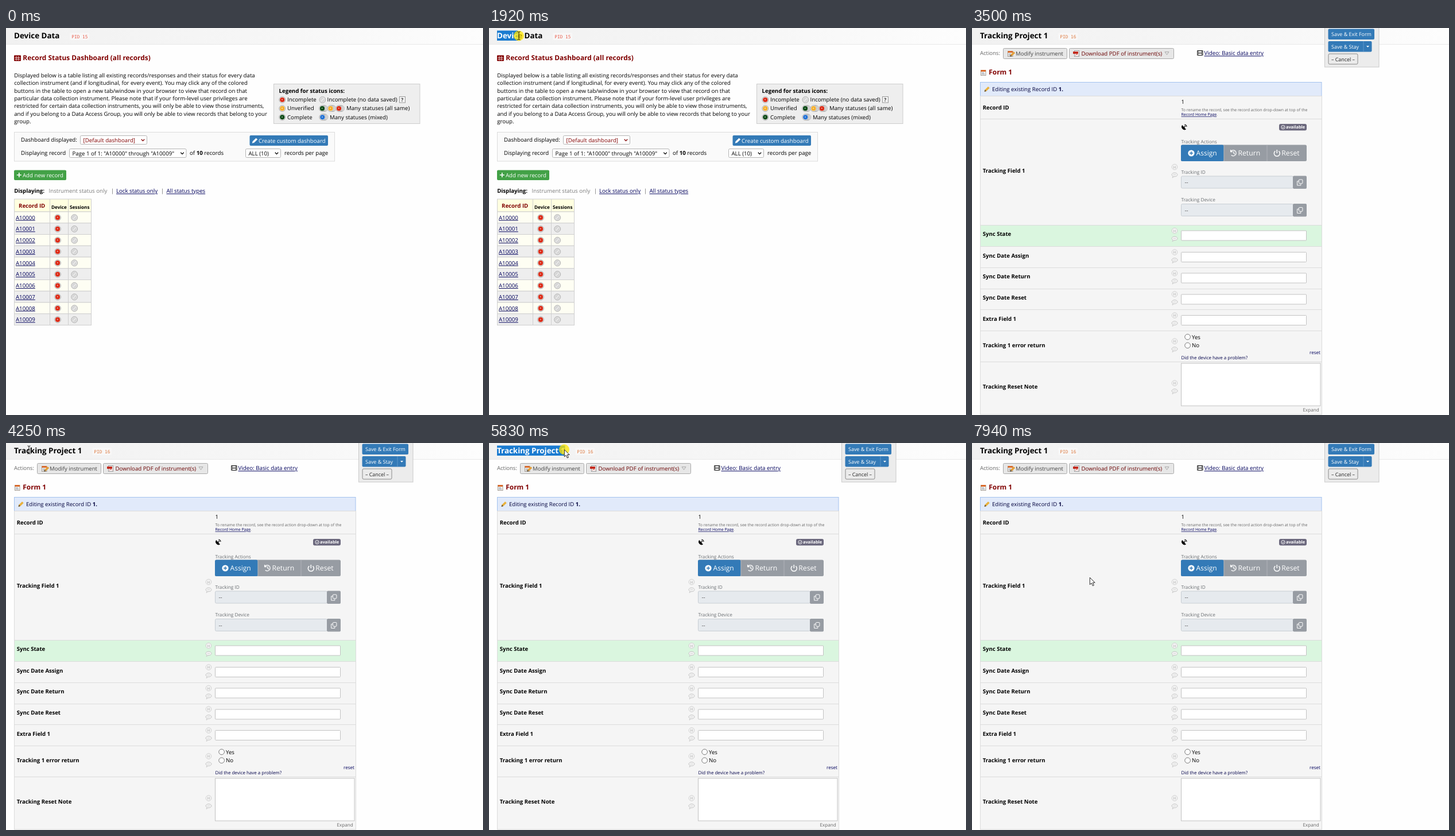
These frames come from a looping animation (831x674 px, 8000 ms). An HTML page:

```html
<!DOCTYPE html>
<html lang="en">
<head>
<meta charset="utf-8">
<title>Record forms</title>
<style>
html, body { margin: 0; width: 100%; height: 100%; overflow: hidden; background: #fefefe; }
svg { display: block; width: 831px; height: 674px; font-family: "Open Sans", "Noto Sans", sans-serif; }
text { white-space: pre; text-rendering: geometricPrecision; }
.b { font-weight: 700; }
.u { text-decoration: underline; }
.m { font-family: "DejaVu Sans Mono", monospace; }
</style>
</head>
<body>
<svg id="stage" viewBox="0 0 831 674"></svg>
<script>
const LOOP = 8000;
const NAVY = '#00005c', MAROON = '#800000', BLUE = '#337ab7', GREY = '#979ca3';

const text = (x, y, s, size = 9.68, fill = '#000', cls = '') =>
  `<text x="${x}" y="${y}" font-size="${size}" fill="${fill}" class="${cls}">${s}</text>`;
const rect = (x, y, w, h, fill, stroke = 'none', r = 0) =>
  `<rect x="${x}" y="${y}" width="${w}" height="${h}" fill="${fill}" stroke="${stroke}" rx="${r}"/>`;
const line = (d, stroke, w = 1, fill = 'none') =>
  `<path d="${d}" stroke="${stroke}" stroke-width="${w}" fill="${fill}"/>`;
const shape = (d, fill) => `<path d="${d}" fill="${fill}"/>`;
const disc = (x, y, r, fill, stroke = 'none', w = 1) =>
  `<circle cx="${x}" cy="${y}" r="${r}" fill="${fill}" stroke="${stroke}" stroke-width="${w}"/>`;
const at = (x, y, s) => `<g transform="translate(${x} ${y})">${s}</g>`;
const each = (list, f) => list.map(f).join('');

const chevron = (x, y, c = '#222') => line(`M${x - 2.7} ${y - 1.4}l2.7 2.8 2.7-2.8`, c, 1.3);
const select = (x, y, w, s, fill = '#000') =>
  rect(x + .5, y + .5, w - 1, 15, '#fff', '#b5b5b5', 2) +
  text(x + 5.5, y + 11.6, s, 9.68, fill) + chevron(x + w - 7.5, y + 8.2, fill);

const DOTS = { red: '#dc2b17', grey: '#d6d6d6', yellow: '#f5b02e', green: '#0b4a16', blue: '#2472d4' };
function dot(x, y, name) {
  const mark = name === 'grey'
    ? line(`M${x - 2.5} ${y + 2.5}l5-5`, '#f2f2f2', 1.2)
    : disc(x - .3, y - .4, 1, '#fff9');
  return disc(x, y, 5.4, '#eee', '#a3a3a3', .9) + disc(x, y, 4.1, DOTS[name]) + mark;
}
const stack = (x, y, name) =>
  each([4, 2], d => disc(x + d, y, 5.4, '#eee', '#a3a3a3', .8)) + dot(x, y, name);

const pencil = (x, y, body, tip) =>
  at(x, y, shape('M0 9l1-3.5 5.6-5.4 2.6 2.4L3.5 8z', body) + shape('M0 9l1-3.5 2.5 2.5z', tip));
const clipboard = (x, y) => at(x, y,
  rect(.5, 1.5, 8.5, 9, '#f7f3ee', '#a09a94') + rect(.5, 1, 8.5, 3, '#d96a2b') +
  line('M2 6h4M2 8.2h5', '#8290a5'));

const header = (pid, x, color) =>
  rect(0, 0, 831, 28, 'url(#bar)') + rect(0, 28, 831, .8, '#e4e4e4') +
  rect(x - 3, 8.5, 34, 12.5, '#f8f7f7', 'none', 2) + text(x, 17.6, pid, 7.75, color, 'm');

// Title with a selection that a clip rectangle reveals
const title = (id, s) =>
  text(14, 17.8, s, 13.4, '#000', 'b') +
  `<g clip-path="url(#clip${id})">` + rect(0, 4.5, 300, 17.5, '#1a7bd0') +
  text(14, 17.8, s, 13.4, '#fff', 'b') + '</g>';

const INTRO = [
  'Displayed below is a table listing all existing records/responses and their status for every data',
  'collection instrument (and if longitudinal, for every event). You may click any of the colored',
  'buttons in the table to open a new tab/window in your browser to view that record on that',
  'particular data collection instrument. Please note that if your form-level user privileges are',
  'restricted for certain data collection instruments, you will only be able to view those instruments,',
  'and if you belong to a Data Access Group, you will only be able to view records that belong to your',
  'group.'];

function legend() {
  return rect(466.5, 97.5, 254.5, 69, '#eee', '#cdcdcd') +
    text(475.5, 112.6, 'Legend for status icons:', 9.68, '#000', 'b') +
    dot(481.3, 125, 'red') + text(490, 128, 'Incomplete') +
    dot(551.4, 125, 'grey') + text(559.5, 128, 'Incomplete (no data saved)') +
    rect(685.5, 119.5, 10, 10.5, '#f4f4f4', '#999') + text(688.3, 128, '?', 8.5, '#333', 'b') +
    dot(481.3, 140.2, 'yellow') + text(490, 143.4, 'Unverified') +
    stack(551, 140.2, 'green') + stack(565.5, 140.2, 'yellow') + stack(580, 140.2, 'red') +
    text(593, 143.4, 'Many statuses (all same)') +
    dot(481.3, 155.3, 'green') + text(490, 158.5, 'Complete') +
    stack(551.3, 155.3, 'blue') + text(564, 158.5, 'Many statuses (mixed)');
}

function recordTable() {
  const pitch = 19.75, top = 320;
  const rows = each([...Array(10).keys()], i => {
    const y = top + i * pitch;
    return rect(14.5, y, 134, pitch, i % 2 ? '#eee' : '#fefef3', '#cfcfcf') +
      text(17, y + 13.6, 'A1000' + i, 9.68, NAVY, 'u') +
      dot(90, y + 10.2, 'red') + dot(119.2, y + 10.2, 'grey');
  });
  return rect(14.5, 298, 134, 22, '#ffffe0', '#cfcfcf') + rows +
    line('M76.5 298V517.5M108.5 298V517.5', '#cfcfcf') +
    text(22, 312.6, 'Record ID', 9.68, MAROON, 'b') +
    text(79, 314.6, 'Device', 8.18, '#000', 'b') + text(111, 314.6, 'Sessions', 8.18, '#000', 'b');
}

function dashboard() {
  return header('PID 15', 114.3, '#e8604f') + title('A', 'Device Data') +
    rect(14, 47.5, 12, 10, MAROON, 'none', 1) +
    line('M15.2 51.3h9.6M15.2 54.3h9.6M18 49v7.5M21.8 49v7.5', '#f3dede', .9) +
    text(29.3, 56, 'Record Status Dashboard (all records)', 11.9, MAROON, 'b') +
    each(INTRO, (s, i) => text(14.2, 85.8 + 13.42 * i, s)) + legend() +
    rect(14.5, 181.5, 558, 50.5, '#fafafa', '#dcdcdc') +
    text(26, 198.3, 'Dashboard displayed:') +
    select(129, 187, 117, '[Default dashboard]', MAROON) +
    rect(424.5, 187, 136.5, 18, BLUE, 'none', 2) + pencil(429, 191.6, '#fff', '#fff') +
    text(440, 199.8, 'Create custom dashboard', 9.68, '#fff') +
    text(26, 221.2, 'Displaying record') +
    select(110, 210, 204.5, 'Page 1 of 1: "A10000" through "A10009"') +
    text(320, 221.2, 'of <tspan class="b">10</tspan> records') +
    select(417, 210, 62, 'ALL (10)') + text(485, 221.2, 'records per page') +
    rect(14, 247.5, 91, 17.5, '#42a146', 'none', 2) + line('M18.8 256h8M22.8 252v8', '#fff', 1.6) +
    text(29, 259.6, 'Add new record', 9.68, '#fff') +
    text(14.2, 287.4, 'Displaying:', 9.68, '#000', 'b') +
    text(74.5, 287.4, 'Instrument status only', 9.68, '#7b7b7b') +
    text(183, 287.4, '|', 9.68, '#666') + text(192, 287.4, 'Lock status only', 9.68, NAVY, 'u') +
    text(270, 287.4, '|', 9.68, '#666') + text(279.5, 287.4, 'All status types', 9.68, NAVY, 'u') +
    recordTable();
}

const fieldIcons = y =>
  disc(353, y, 4.8, '#f3f3f3', '#cdcdcd', .9) + text(350.6, y + 2.5, 'H', 6.6, '#aaa') +
  at(353, y + 13.5, `<ellipse rx="5" ry="3.3" fill="#f4f4f4" stroke="#c4c4c4"/>` +
    line('M-3 2.5l-1 3 3-2', '#c4c4c4', .8, '#f4f4f4') + line('M-2.5 0h5', '#ccc', .8));

const copyField = (label, y) =>
  text(364.5, y - 4, label, 8.25, '#6a6e72') +
  rect(364.5, y + .5, 195, 21, '#e6eaee', '#c8ced4', 2) + text(370.5, y + 14.8, '--', 9.68, '#555') +
  rect(559, y, 24, 22.5, GREY, 'none', 2) +
  at(566, y + 6, rect(3.4, .5, 6.5, 6.8, GREY, '#fff', 1) +
    line('M3 3.3H.6v7.2h6.2V8', '#fff'));

const actionButtons = () =>
  rect(364, 203.5, 219, 28.5, GREY, 'none', 2.5) + rect(364, 203.5, 74.5, 28.5, BLUE, 'none', 2.5) +
  line('M439 203.5v28.5M514 203.5v28.5', '#b8bcc2', .8) +
  disc(382, 218, 5.6, '#fff') + line('M379 218h6M382 215v6', BLUE, 1.4) +
  text(390.6, 222, 'Assign', 12, '#fff') +
  line('M451.3 214.5a5 5 0 1 1 .4 7M450.6 212v3.5h3.6M456 214.8v3.4l2 1.5', '#fff', 1.3) +
  text(463.5, 222, 'Return', 12.2, '#fff') +
  line('M528.3 214.3a5 5 0 1 0 6 0M531.3 212v6', '#fff', 1.5) +
  text(539.3, 222, 'Reset', 12.2, '#fff');

const dish = () => at(365, 167,
  shape('M1.2 2A5.2 5.2 0 0 0 8 9.6L5 6.6 6.2 5.4 5 4.3 4 5.3z', '#000') +
  line('M5.2 1.2A4 4 0 0 1 9 5M5.2 3.2A2 2 0 0 1 7 5', '#000', 1.1));

const EDGES = [118.5, 158.5, 343.5, 380.5, 417.5, 454.5, 490.5, 527.5, 581.5, 673];
const LABELS = [
  ['Record ID', 142.3], ['Tracking Field 1', 252, 242], ['Sync State', 362.3, 353],
  ['Sync Date Assign', 399.6, 390.5], ['Sync Date Return', 436.3, 427],
  ['Sync Date Reset', 473.3, 463.5], ['Extra Field 1', 510.2, 500.5],
  ['Tracking 1 error return', 555.5, 545.5], ['Tracking Reset Note', 627.6, 618.5]];

function formTable() {
  return rect(14.5, 94.5, 594.5, 24, '#e1eafa', '#a3c2ee') +
    pencil(21.5, 102, '#e9b13c', '#5b4a35') +
    text(35, 109.6, 'Editing existing Record ID <tspan class="b">1.</tspan>', 9.6, '#00003c') +
    each(LABELS, ([s, y, icon], i) =>
      rect(14.5, EDGES[i], 595, EDGES[i + 1] - EDGES[i], i === 2 ? '#daf6df' : '#f5f5f5', '#dcdcdc') +
      text(18.7, y, s, 9.6, '#000', 'b') + (icon ? fieldIcons(icon) : '')) +
    text(364.5, 132, '1') +
    text(364.5, 145.3, 'To rename the record, see the record action drop-down at top of the', 6.95, '#666') +
    text(364.5, 153.2, `<tspan class="u" fill="${NAVY}">Record Home Page</tspan>.`, 6.95, '#666') +
    dish() + rect(535, 167, 48, 11.5, '#6b687d', 'none', 3) +
    disc(542, 172.7, 3.2, 'none', '#fff', .9) + line('M540.4 172.7l1.3 1.3 2.2-2.4', '#fff', .9) +
    text(547, 175.4, 'available', 7.35, '#fff', 'b') +
    text(364.5, 200.7, 'Tracking Actions', 8.25, '#6a6e72') + actionButtons() +
    copyField('Tracking ID', 257.5) + copyField('Tracking Device', 306) +
    each([353, 390.5, 427, 464, 500.5], y => rect(364.5, y, 218, 17, '#fff', '#c2c2c2', 1)) +
    each([['Yes', 538], ['No', 552.8]], ([s, y]) =>
      disc(375.6, y, 4.8, '#fff', '#777') + text(383, y + 3.6, s)) +
    text(588, 567.6, 'reset', 8.1, NAVY) +
    text(364.5, 576.6, 'Did the device have a problem?', 7.96, '#00004a') +
    rect(364.5, 584, 242.5, 74, '#fff', '#c2c2c2') + text(576.5, 667.5, 'Expand', 8.1, '#666');
}

function form() {
  return header('PID 16', 153.3, '#dd7d45') + title('B', 'Tracking Project 1') +
    text(14, 47.3, 'Actions:', 9.5, '#666') +
    rect(54.5, 35.5, 111, 18, '#e7e7e7', '#a9a9a9', 2) + clipboard(62, 39) +
    pencil(66, 41, '#e3a03c', '#555') + text(76, 48.4, 'Modify instrument', 9.6, '#444') +
    rect(169.5, 35.5, 182, 18, '#e7e7e7', '#a9a9a9', 2) +
    rect(178.5, 39.5, 8, 10, '#fff', '#999') + rect(176, 41, 9, 4, '#c32b1f') +
    line('M180 47.5l3-2 2 2', '#c32b1f') +
    text(190.5, 48.4, 'Download PDF of instrument(s)', 9.68, '#6a0000') +
    line('M336 41.6h7l-3.5 5z', '#999', .8) +
    rect(392, 39, 10.5, 9, '#111', 'none', 1) + rect(394.4, 40.2, 5.6, 2.8, '#fff') +
    rect(394.4, 44.2, 5.6, 2.8, '#fff') + line('M393.2 40v7.5M401.2 40v7.5', '#ddd', .9) +
    text(404.5, 47.4, 'Video: Basic data entry', 9.75, NAVY, 'u') +
    clipboard(15, 72) + text(29.3, 81, 'Form 1', 11.9, MAROON, 'b') +
    rect(614.5, -2, 94.5, 70, '#ececec', '#c9c9c9') +
    rect(620.5, 1.5, 80.5, 18.5, BLUE, 'none', 2) + text(626, 14.2, 'Save &amp; Exit Form', 8.95, '#fff') +
    rect(620.5, 23, 76, 18.5, BLUE, 'none', 2) + text(626, 35.7, 'Save &amp; Stay', 8.95, '#fff') +
    line('M682 23v18.5', '#6aa0d0', .8) + shape('M687 31h5l-2.5 2.8z', '#fff') +
    rect(621, 45, 51, 18, '#ebebeb', '#8a8a8a', 2) + text(626, 57.6, '– Cancel –', 8.9, '#222') +
    formTable();
}

const stage = document.getElementById('stage');
stage.innerHTML =
  `<defs><linearGradient id="bar"><stop stop-color="#f1f1f1"/><stop offset=".6" stop-color="#f7f7f7"/>
   <stop offset="1" stop-color="#fdfdfd"/></linearGradient>` +
  each(['A', 'B'], id => `<clipPath id="clip${id}"><rect id="sel${id}" x="14" y="0" width="0" height="30"/></clipPath>`) +
  '</defs>' + rect(0, 0, 831, 674, '#fefefe') +
  `<g id="pageA">${dashboard()}</g><g id="pageB">${form()}</g>
   <g id="pointer"><circle id="halo" r="9" fill="#ffe600" opacity=".75"/>
   <path id="arrow" d="M.3.3V12.6L3.2 10 5.3 14.7 7.4 13.8 5.3 9.2H9.2z" fill="#fff" stroke="#111" stroke-width=".9"/>
   <path id="beam" d="M-2.5-7q2 0 2.5 1 .5-1 2.5-1M0-6V6M-2.5 7q2 0 2.5-1 .5 1 2.5 1" fill="none" stroke="#111"/></g>`;

const $ = id => document.getElementById(id);
const show = (id, on) => $(id).setAttribute('visibility', on ? 'visible' : 'hidden');

// Character boxes of each title, for selecting letter by letter
const glyphs = {};
for (const id of ['A', 'B']) {
  const el = $('page' + id).querySelector('g[clip-path] text');
  glyphs[id] = [...el.textContent].map((_, i) =>
    [el.getStartPositionOfChar(i).x, el.getEndPositionOfChar(i).x]);
}

// Pointer moves: start, end, then way points; the pointer rests in between
const STEP = 70;
const MOVES = [
  [330, 1100, 766, 658, 560, 400, 300, 180, 110, 62, 36, 20, 23.5, 15.5],
  [1230, 1370, 23, 15.5, 20.5, 15.5],
  [1570, 2340, 19.5, 13.5, 91, 13.5],
  [2610, 2680, 120, 10, 194, 2],
  [3900, 4600, 247, 42, 120, 24, 40, 12, 1.5, 9, 13, 10.5],
  [4800, 4870, 13.3, 10.5, 13.7, 11.3],
  [5070, 5830, 13.7, 11.3, 131, 11.3],
  [5900, 5970, 131.5, 12, 131.5, 12],
  [6230, 6910, 136, 18, 230, 130, 287, 268, 250, 262, 215, 251],
  [7050, 7810, 160, 262, 52, 300, 150, 386, 340, 370, 460, 270, 400, 160, 430, 193],
  [7880, 7940, 320, 215, 205, 234]];

function pointerAt(t) {
  const move = MOVES.filter(m => m[0] <= t).pop();
  if (!move) return null;
  const [start, end, ...p] = move;
  const n = Math.round((end - start) / STEP);
  const k = Math.min(1, Math.floor((t - start) / (end - start) * n + 1e-6) / n);
  const legs = p.length / 2 - 1, pos = k * legs, i = Math.min(legs - 1, Math.floor(pos)), f = pos - i;
  const mix = j => p[j] + (p[j + 2] - p[j]) * f;
  return { x: mix(2 * i), y: mix(2 * i + 1) };
}

function setSelection(id, on, x) {
  const last = on ? glyphs[id].filter(([a, b]) => (a + b) / 2 <= x).pop() : null;
  $('sel' + id).setAttribute('width', last ? last[1] - 14 : 0);
}

function draw(t) {
  const second = t >= 3500;
  show('pageA', !second);
  show('pageB', second);
  const p = pointerAt(t) || { x: 0, y: 0 };
  setSelection('A', t >= 1570 && !second, t < 2610 ? p.x : 200);
  setSelection('B', t >= 5070 && t < 6580, t < 5900 ? p.x : 200);

  const visible = t >= 330 && (t < 2750 || t >= 3900);
  const overTitle = p.x > 16 && p.x < (second ? 130 : 96) && p.y > 4 && p.y < 24;
  $('pointer').setAttribute('transform', `translate(${p.x} ${p.y})`);
  show('arrow', visible && !overTitle);
  show('beam', visible && overTitle);
  show('halo', (t >= 1570 && t < 2610) || (t >= 5070 && t < 5900));
}

const begin = performance.now();
function tick() {
  draw((performance.now() - begin) % LOOP);
  requestAnimationFrame(tick);
}
tick();
</script>
</body>
</html>
```
